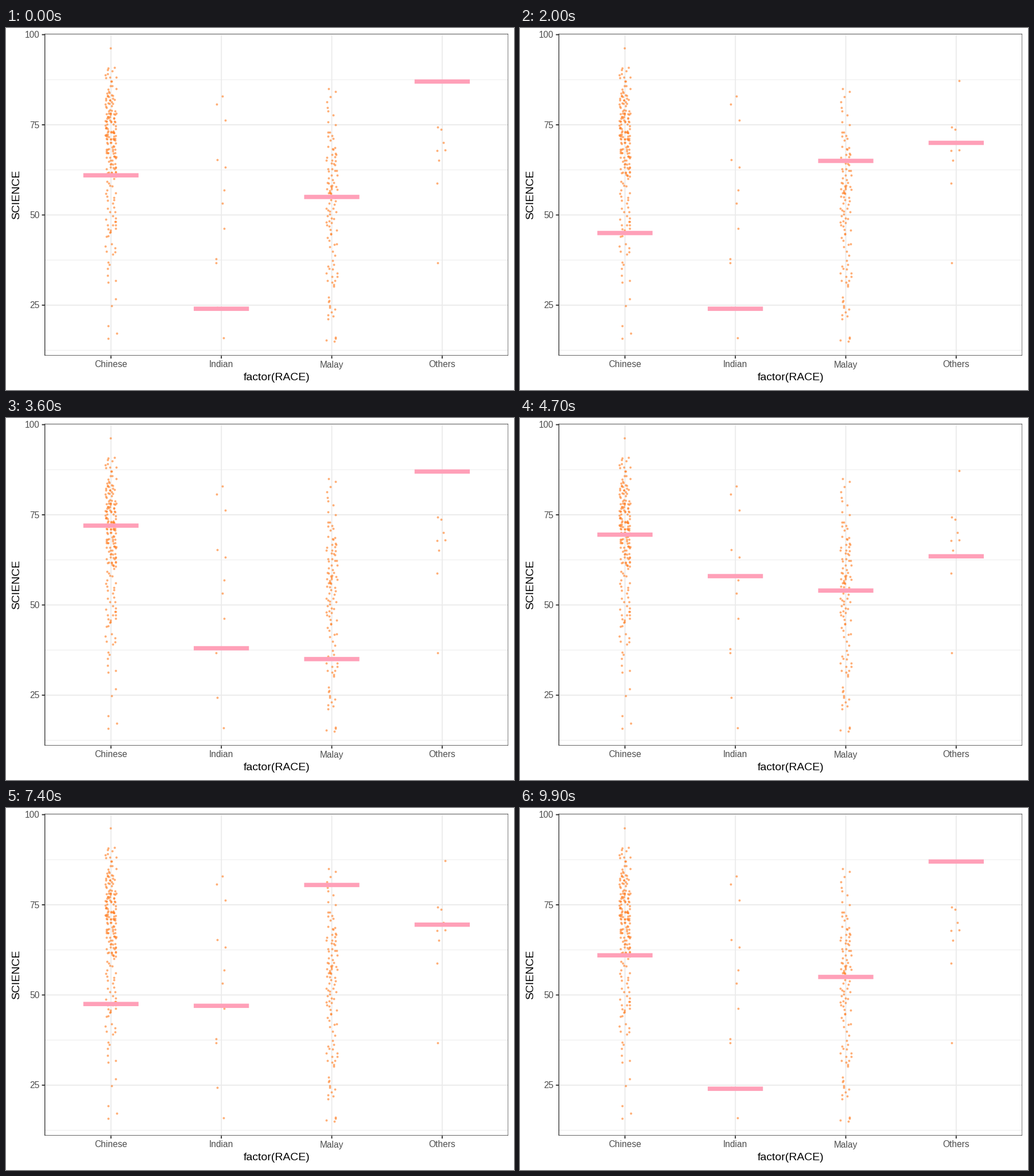
Animation, 885 px wide and 632 px high, one loop 10 s. Source, as a matplotlib script:

```python
import numpy as np
import matplotlib.pyplot as plt
from matplotlib.animation import FuncAnimation
from matplotlib.patches import Rectangle

W, H, DPI = 885, 632, 64
LEFT, RIGHT, TOP, BOTTOM = 67.4, 875.3, 9.8, 572.2
STEP = (RIGHT - LEFT) / 4.2
GROUPS = ["Chinese", "Indian", "Malay", "Others"]
BAR_HEIGHT = 7.5
POINT, BAR = "#ff7f24", "#ffa0b8"
GRID, DARK, LABEL = "#ebebeb", "#333333", "#4d4d4d"

# One sampled score per group for each draw
DRAWS = np.array([
    (61, 24, 55, 87), (72, 38, 58, 68), (85, 65, 57, 74), (70, 63, 69, 87),
    (79, 16, 48, 65), (45, 24, 65, 70), (66, 76, 15, 70), (74, 57, 60, 65),
    (82, 46, 32, 68), (72, 38, 35, 87), (90, 24, 61, 70), (67, 53, 58, 68),
    (72, 63, 50, 59), (65, 46, 57, 74), (74, 81, 57, 74), (49, 24, 45, 68),
    (70, 83, 58, 37), (74, 83, 50, 68), (25, 57, 77, 65), (70, 37, 84, 74),
    (77, 46, 21, 87), (77, 81, 64, 87), (82, 16, 57, 37), (68, 16, 63, 70),
    (73, 76, 60, 68),
])

# Isolated points as (pixel offset from the group centre, score)
ISOLATED = [
    [(-1, 96.3), (10, 17.2), (-4.5, 15.8), (-4.5, 19.3), (1.5, 24.8),
     (8.5, 26.7)],
    [(1.5, 83), (-8, 80.8), (6.5, 76.2), (-7, 65.3), (7, 63.3), (5, 56.9),
     (1.7, 53.2), (5, 46.3), (-9.5, 37.9), (-9.2, 36.8), (-7, 24.3), (4.2, 16)],
    [(-5.3, 85), (-9.3, 15.3), (6.3, 16.1), (6.5, 15.8), (4, 15)],
    [(5, 87.3), (-8.3, 74.3), (-2.3, 73.8), (2, 70.1), (-9, 67.8),
     (4.8, 68), (-6, 65.2), (-8.5, 58.8), (-7.7, 36.8)],
]
# Jittered clusters: group -> (first score, last score, count)
CLUSTERS = {
    0: [(31, 37, 6), (39, 42, 6), (44, 49, 14), (50, 60, 18), (61, 64, 20),
        (65, 69, 25), (70, 74, 36), (75, 79, 31), (80, 84, 22), (85, 91, 15)],
    2: [(21, 27, 10), (30, 37, 14), (39, 44, 7), (45, 54, 22), (55, 59, 18),
        (60, 69, 24), (71, 73, 6), (75, 84, 8)],
}


def x_at(group):
    return LEFT + (group + 0.6) * STEP


def y_at(score):
    return 641.3 - 6.297 * score


def pt(pixels):
    return pixels * 72 / DPI


def cluster_points(ranges, rng):
    scores = np.concatenate([np.round(np.linspace(*r)) for r in ranges])
    dx = rng.uniform(-9.6, 9.6, scores.size)
    return np.column_stack([dx, scores + rng.uniform(-0.3, 0.3, scores.size)])


fig = plt.figure(figsize=(W / DPI, H / DPI), dpi=DPI, facecolor="white")
ax = fig.add_axes([0, 0, 1, 1], xlim=(0, W), ylim=(H, 0))
ax.axis("off")
panel = Rectangle((LEFT, TOP), RIGHT - LEFT, BOTTOM - TOP,
                  transform=ax.transData)


def line(xs, ys, color, width, z, clip=True):
    artist, = ax.plot(xs, ys, color=color, lw=pt(width), zorder=z,
                      snap=False, solid_capstyle="butt")
    if clip:
        artist.set_clip_path(panel)


def label(x, y, text, size, color, ha="center", rotation=0):
    ax.text(x, y, text, fontsize=pt(size), color=color, ha=ha, va="baseline",
            rotation=rotation, rotation_mode="anchor", family="Liberation Sans")


for score in np.arange(12.5, 100, 25):
    line([LEFT, RIGHT], [y_at(score)] * 2, GRID, 0.95, 1)
for score in range(25, 101, 25):
    y = y_at(score)
    line([LEFT, RIGHT], [y, y], GRID, 1.9, 1)
    line([LEFT - 4.85, LEFT], [y, y], DARK, 1.9, 5, clip=False)
    label(58.5, y + 5.5, str(score), 15.5, LABEL, ha="right")
for i, name in enumerate(GROUPS):
    x = x_at(i)
    line([x, x], [TOP, BOTTOM], GRID, 1.9, 1)
    line([x, x], [BOTTOM, BOTTOM + 4.85], DARK, 1.9, 5, clip=False)
    label(x, 592.5, name, 15.5, LABEL)
label((LEFT + RIGHT) / 2, 615, "factor(RACE)", 19.4, "black")
label(23.4, (TOP + BOTTOM) / 2, "SCIENCE", 19.4, "black", rotation=90)

border = Rectangle((LEFT, TOP), RIGHT - LEFT, BOTTOM - TOP, fill=False,
                   ec=DARK, lw=pt(1.9), zorder=4, snap=False)
ax.add_patch(border)
border.set_clip_path(panel)

rng = np.random.default_rng(12)
for i, isolated in enumerate(ISOLATED):
    points = np.array(isolated)
    if i in CLUSTERS:
        points = np.vstack([points, cluster_points(CLUSTERS[i], rng)])
    ax.scatter(x_at(i) + points[:, 0], y_at(points[:, 1]), s=pt(2.76) ** 2,
               color=POINT, alpha=0.5, linewidths=pt(1.25), zorder=2)

bars = [ax.add_patch(Rectangle((x_at(i) - STEP / 4, 0), STEP / 2, BAR_HEIGHT,
                               fc=BAR, lw=0, zorder=3, snap=False))
        for i in range(len(GROUPS))]


def update(frame):
    # Three ticks of hold and one halfway tick per draw; one hold is cut short
    tick = frame if frame < 49 else frame + 1
    k, phase = divmod(tick, 4)
    scores = DRAWS[k % len(DRAWS)]
    if phase == 3:
        scores = (scores + DRAWS[(k + 1) % len(DRAWS)]) / 2
    for bar, score in zip(bars, scores):
        bar.set_y(y_at(score) - BAR_HEIGHT / 2)
    return bars


anim = FuncAnimation(fig, update, frames=100, interval=100, repeat=True,
                     repeat_delay=0)
plt.show()
```
